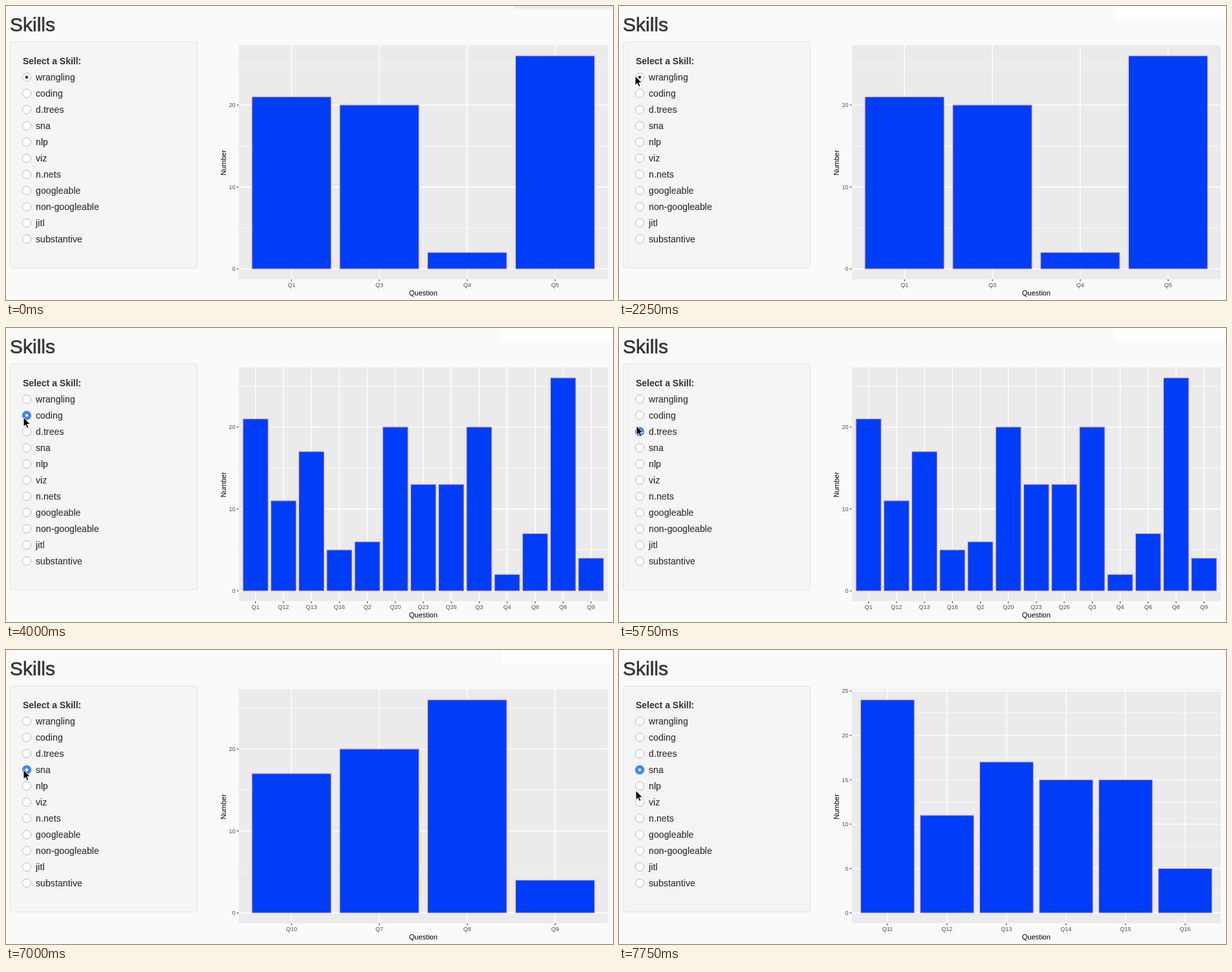
An HTML page that plays this animation: 938 px wide and 454 px high, repeating every 8 s.

```html
<!DOCTYPE html>
<html lang="en">
<head>
<meta charset="utf-8">
<title>Skills</title>
<style>
html, body { margin: 0; width: 100%; height: 100%; overflow: hidden; background: #fafafa; }
svg { display: block; width: 938px; height: 454px; font-family: "Liberation Sans", Arial, sans-serif; }
text { fill: #333; }
.title { font-size: 30px; stroke: #333; stroke-width: .6px; }
.label { font-size: 14px; letter-spacing: .1px; stroke: #333; stroke-width: .15px; }
.head { font-size: 14px; font-weight: bold; }
.tick { font-size: 9px; fill: #4d4d4d; }
.axis { font-size: 11px; fill: #000; }
.major { stroke: #fff; stroke-width: 1.4; }
.minor { stroke: #fff; stroke-width: .7; }
.mark { stroke: #333; stroke-width: 1; }
.bar { fill: #003df7; stroke: #dba6c4; stroke-width: 1; }

/* hard cuts, one step = 250 ms = 3.125% */
.cut { animation: 8s step-end infinite; }
.shade { animation-name: shade; }
.strip { animation-name: strip; }
.well { animation-name: well; }
#chart0 { animation-name: chart0; }
#chart1 { animation-name: chart1; }
#chart2 { animation-name: chart2; }
#chart3 { animation-name: chart3; }
#pick0 { animation-name: pick0; }
#pick1 { animation-name: pick1; }
#pick2 { animation-name: pick2; }
#pick3 { animation-name: pick3; }
.cursor { animation-name: move; }

@keyframes shade { 0% { opacity: 1 } 3.125%, 100% { opacity: 0 } }
@keyframes strip { 0% { opacity: 0 } 3.125% { opacity: 1 } 96.875%, 100% { opacity: 0 } }
@keyframes well { 0% { fill: #f5f5f5 } 96.875%, 100% { fill: #f4f3f6 } }
@keyframes chart0 { 0% { opacity: 1 } 50%, 100% { opacity: 0 } }
@keyframes chart1 { 0% { opacity: 0 } 50% { opacity: 1 } 75%, 100% { opacity: 0 } }
@keyframes chart2 { 0% { opacity: 0 } 75% { opacity: 1 } 90.625%, 100% { opacity: 0 } }
@keyframes chart3 { 0% { opacity: 0 } 90.625%, 100% { opacity: 1 } }
@keyframes pick0 { 0% { opacity: 1 } 46.875%, 100% { opacity: 0 } }
@keyframes pick1 { 0% { opacity: 0 } 46.875% { opacity: 1 } 71.875%, 100% { opacity: 0 } }
@keyframes pick2 { 0% { opacity: 0 } 71.875% { opacity: 1 } 87.5%, 100% { opacity: 0 } }
@keyframes pick3 { 0% { opacity: 0 } 87.5%, 100% { opacity: 1 } }
@keyframes move {
  0% { transform: translate(960px, 10px) }
  3.125% { transform: translate(720px, 16px) }
  6.25% { transform: translate(330px, 52px) }
  9.375% { transform: translate(90px, 84px) }
  12.5% { transform: translate(17px, 98px) }
  15.625% { transform: translate(18px, 101px) }
  18.75% { transform: translate(22px, 104px) }
  21.875% { transform: translate(24px, 110px) }
  25% { transform: translate(25px, 112px) }
  28.125% { transform: translate(25px, 108px) }
  34.375% { transform: translate(25px, 115px) }
  37.5% { transform: translate(26px, 130px) }
  40.625% { transform: translate(27px, 146px) }
  43.75% { transform: translate(27px, 141px) }
  46.875% { transform: translate(27px, 138px) }
  53.125% { transform: translate(27px, 145px) }
  56.25% { transform: translate(27px, 151px) }
  78.125% { transform: translate(27px, 160px) }
  81.25% { transform: translate(27px, 175px) }
  84.375% { transform: translate(27px, 185px) }
  93.75% { transform: translate(27px, 202px) }
  96.875%, 100% { transform: translate(26px, 217px) }
}
</style>
</head>
<body>
<svg viewBox="0 0 938 454">
  <defs>
    <linearGradient id="fade" x2="0" y2="1">
      <stop offset="0" stop-color="#e6e6e6"/>
      <stop offset="1" stop-color="#fafafa"/>
    </linearGradient>
  </defs>
  <rect width="938" height="454" fill="#fafafa"/>
  <rect class="cut shade" x="786" width="152" height="7" fill="url(#fade)"/>
  <rect class="cut strip" x="767" width="171" height="20" fill="#fff"/>
  <text class="title" x="6" y="39">Skills</text>
  <rect class="cut well" x="6.5" y="55.5" width="289" height="349" rx="4" stroke="#e1e1e1"/>
  <text class="head" x="26" y="90">Select a Skill:</text>
  <g id="radios"></g>
  <g id="charts"></g>
  <text class="axis" x="644.8" y="447" text-anchor="middle">Question</text>
  <text class="axis" transform="translate(339.5 242) rotate(-90)" text-anchor="middle">Number</text>
  <path class="cut cursor" d="M0 0V14.5L3.3 11.4L5.6 16.6L8 15.6L5.8 10.5H10.3Z" fill="#000" stroke="#fff" stroke-width="1" stroke-linejoin="round"/>
</svg>
<script>
const skills = ["wrangling", "coding", "d.trees", "sna", "nlp", "viz", "n.nets",
  "googleable", "non-googleable", "jitl", "substantive"];

// question numbers and their counts, major grid step
const charts = [
  { q: [1, 3, 4, 5], n: [21, 20, 2, 26], step: 10 },
  { q: [1, 12, 13, 16, 2, 20, 23, 26, 3, 4, 6, 8, 9],
    n: [21, 11, 17, 5, 6, 20, 13, 13, 20, 2, 7, 26, 4], step: 10 },
  { q: [10, 7, 8, 9], n: [17, 20, 26, 4], step: 10 },
  { q: [11, 12, 13, 14, 15, 16], n: [24, 11, 17, 15, 15, 5], step: 5 }
];
const panel = { left: 359.7, right: 930, top: 60.5, bottom: 422 };
const base = 406, barTop = 77;

function add(parent, tag, attrs, text) {
  const el = document.createElementNS("http://www.w3.org/2000/svg", tag);
  for (const key in attrs) el.setAttribute(key, attrs[key]);
  if (text !== undefined) el.textContent = text;
  return parent.appendChild(el);
}

function line(parent, cls, x1, y1, x2, y2) {
  add(parent, "line", { class: cls, x1, y1, x2, y2 });
}

function drawRadios(root) {
  skills.forEach((name, i) => {
    const cy = 110 + 25 * i;
    add(root, "circle", { cx: 32, cy, r: 6.6, fill: "#fff", stroke: "#b9b9b9", "stroke-width": 1 });
    add(root, "text", { class: "label", x: 46, y: cy + 5 }, name);
    if (i > 3) return;
    const pick = add(root, "g", { id: "pick" + i, class: "cut" });
    if (i) add(pick, "circle", { cx: 32, cy, r: 7.1, fill: "#3e86f7" });
    add(pick, "circle", { cx: 32, cy, r: 2.3, fill: i ? "#fff" : "#333" });
  });
}

function drawChart(root, { q, n, step }, i) {
  const { left, right, top, bottom } = panel;
  const g = add(root, "g", { id: "chart" + i, class: "cut" });
  const unit = (base - barTop) / Math.max(...n);
  const slot = (right - left) / (q.length + .2);
  const xs = q.map((_, k) => left + slot * (k + .6));
  add(g, "rect", { x: left, y: top, width: right - left, height: bottom - top, fill: "#ebebeb" });

  for (let v = step / 2; base - v * unit > top; v += step)
    line(g, "minor", left, base - v * unit, right, base - v * unit);
  for (let v = 0; base - v * unit > top; v += step) {
    const y = base - v * unit;
    line(g, "major", left, y, right, y);
    line(g, "mark", left - 3, y, left, y);
    add(g, "text", { class: "tick", x: 354.5, y: y + 3.2, "text-anchor": "end" }, v);
  }
  xs.forEach((x, k) => {
    line(g, "major", x, top, x, bottom);
    line(g, "mark", x, bottom, x, bottom + 3);
    add(g, "text", { class: "tick", x, y: 434, "text-anchor": "middle" }, "Q" + q[k]);
  });
  xs.forEach((x, k) => add(g, "rect", {
    class: "bar", x: x - slot * .45, y: base - n[k] * unit, width: slot * .9, height: n[k] * unit
  }));
}

drawRadios(document.getElementById("radios"));
charts.forEach((c, i) => drawChart(document.getElementById("charts"), c, i));
</script>
</body>
</html>
```
